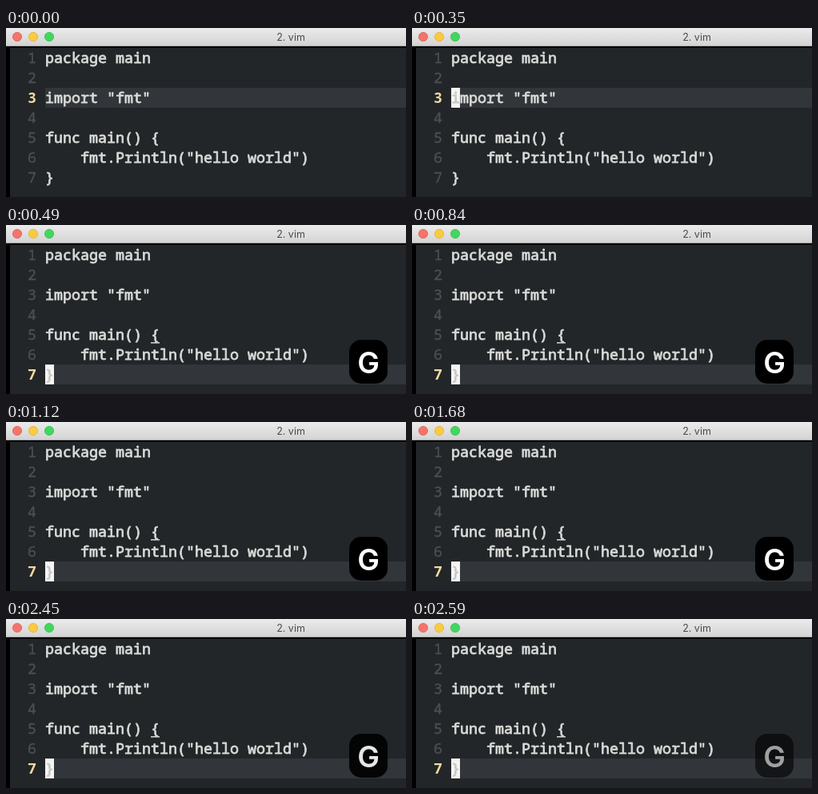
Write an HTML page with a canvas that moves like this. It is 500 by 212 pixels and loops after 2660 ms.

```html
<!DOCTYPE html>
<html lang="en">
<head>
<meta charset="utf-8">
<title>2. vim</title>
<style>
html, body { margin: 0; width: 100%; height: 100%; overflow: hidden; background: #000; }
canvas { display: block; width: 500px; height: 212px; }
</style>
</head>
<body>
<canvas id="stage"></canvas>
<script>
const W = 500, H = 212, LOOP = 2660;
const CELL = 11, ROW = 25, LEFT = 49, NUMBER_X = 27, BASELINE = 19;
const MONO = '18.33px "Noto Sans Mono", "DejaVu Sans Mono", monospace';
const SANS = 'Inter, Roboto, sans-serif';
const LINES = [
  'package main', '', 'import "fmt"', '',
  'func main() {', '    fmt.Println("hello world")', '}'
];
const COLOR = {
  back: '#222629', row: '#32353a', text: '#d9dad7', number: '#4b4f52',
  current: '#f2d9a0', cursor: '#f4f4f2', underCursor: '#c6c7c5'
};
const TIMING = { cursorOn: 350, key: 420, jump: 490, blinkOff: 2100, blinkOn: 2380, fade: 2450 };

const canvas = document.getElementById('stage');
const ctx = canvas.getContext('2d');
const scale = window.devicePixelRatio || 1;
canvas.width = W * scale;
canvas.height = H * scale;

function rect(x, y, w, h, color) {
  ctx.fillStyle = color;
  ctx.fillRect(x, y, w, h);
}

function text(str, x, y, font, color, align = 'left') {
  ctx.font = font;
  ctx.fillStyle = color;
  ctx.textAlign = align;
  ctx.fillText(str, x, y);
}

// A thin outline gives the code its medium-heavy weight.
function codeText(str, x, y, color, weight) {
  text(str, x, y, `400 ${MONO}`, color);
  ctx.strokeStyle = color;
  ctx.lineWidth = weight;
  ctx.lineJoin = 'round';
  ctx.strokeText(str, x, y);
}

function drawTitleBar() {
  const shade = ctx.createLinearGradient(0, 0, 0, 22);
  shade.addColorStop(0, '#ebebeb');
  shade.addColorStop(1, '#d4d4d4');
  rect(0, 0, W, 22, shade);
  rect(0, 22, W, 1, '#a9a9a9');
  [['#f4746b', '#dc5f57', 14], ['#fbca43', '#dfb03a', 34], ['#41d75f', '#35bd50', 54]]
    .forEach(([fill, rim, x]) => {
      ctx.fillStyle = fill;
      ctx.strokeStyle = rim;
      ctx.lineWidth = 0.8;
      ctx.beginPath();
      ctx.arc(x, 11, 5.6, 0, Math.PI * 2);
      ctx.fill();
      ctx.stroke();
    });
  text('2. vim', 356, 15.5, `400 12.5px ${SANS}`, '#4c4c4c', 'center');
}

function drawLine(line, index, active) {
  const top = (index + 1) * ROW;
  const y = top + BASELINE;
  if (active) rect(LEFT, top, W - LEFT, ROW, COLOR.row);
  if (active) text(index + 1, NUMBER_X, y, `700 ${MONO}`, COLOR.current);
  else codeText(index + 1, NUMBER_X, y, COLOR.number, 0.4);
  codeText(line, LEFT, y, COLOR.text, 0.8);
}

function underline(column, line) {
  rect(LEFT + column * CELL, line * ROW + 22, CELL, 1.5, COLOR.text);
}

function drawCursor(line) {
  rect(LEFT, line * ROW, CELL, ROW, COLOR.cursor);
  codeText(LINES[line - 1][0], LEFT, line * ROW + BASELINE, COLOR.underCursor, 0.8);
}

function drawKey(alpha) {
  ctx.globalAlpha = alpha;
  ctx.fillStyle = '#000';
  ctx.beginPath();
  ctx.roundRect(429, 144, 48, 55, 15);
  ctx.fill();
  text('G', 453, 185.5, `600 37px ${SANS}`, '#fff', 'center');
  ctx.globalAlpha = 1;
}

function keyAlpha(t) {
  if (t < TIMING.key) return 0;
  if (t < TIMING.fade) return 1;
  return 0.9 - 0.15 * Math.floor((t - TIMING.fade) / 70);
}

function draw(t) {
  const jumped = t >= TIMING.jump;
  const active = jumped ? 7 : 3;
  const cursorOn = t >= TIMING.cursorOn && (t < TIMING.blinkOff || t >= TIMING.blinkOn);

  ctx.setTransform(scale, 0, 0, scale, 0, 0);
  rect(0, 0, W, H, '#000');
  rect(5, 25, W - 5, H - 25, COLOR.back);
  drawTitleBar();
  LINES.forEach((line, i) => drawLine(line, i, i + 1 === active));
  if (jumped) {
    underline(12, 5);
    underline(0, 7);
  }
  if (cursorOn) drawCursor(active);
  const alpha = keyAlpha(t);
  if (alpha > 0) drawKey(alpha);
}

const start = performance.now();
function frame() {
  draw((performance.now() - start) % LOOP);
  requestAnimationFrame(frame);
}
frame();
</script>
</body>
</html>
```
